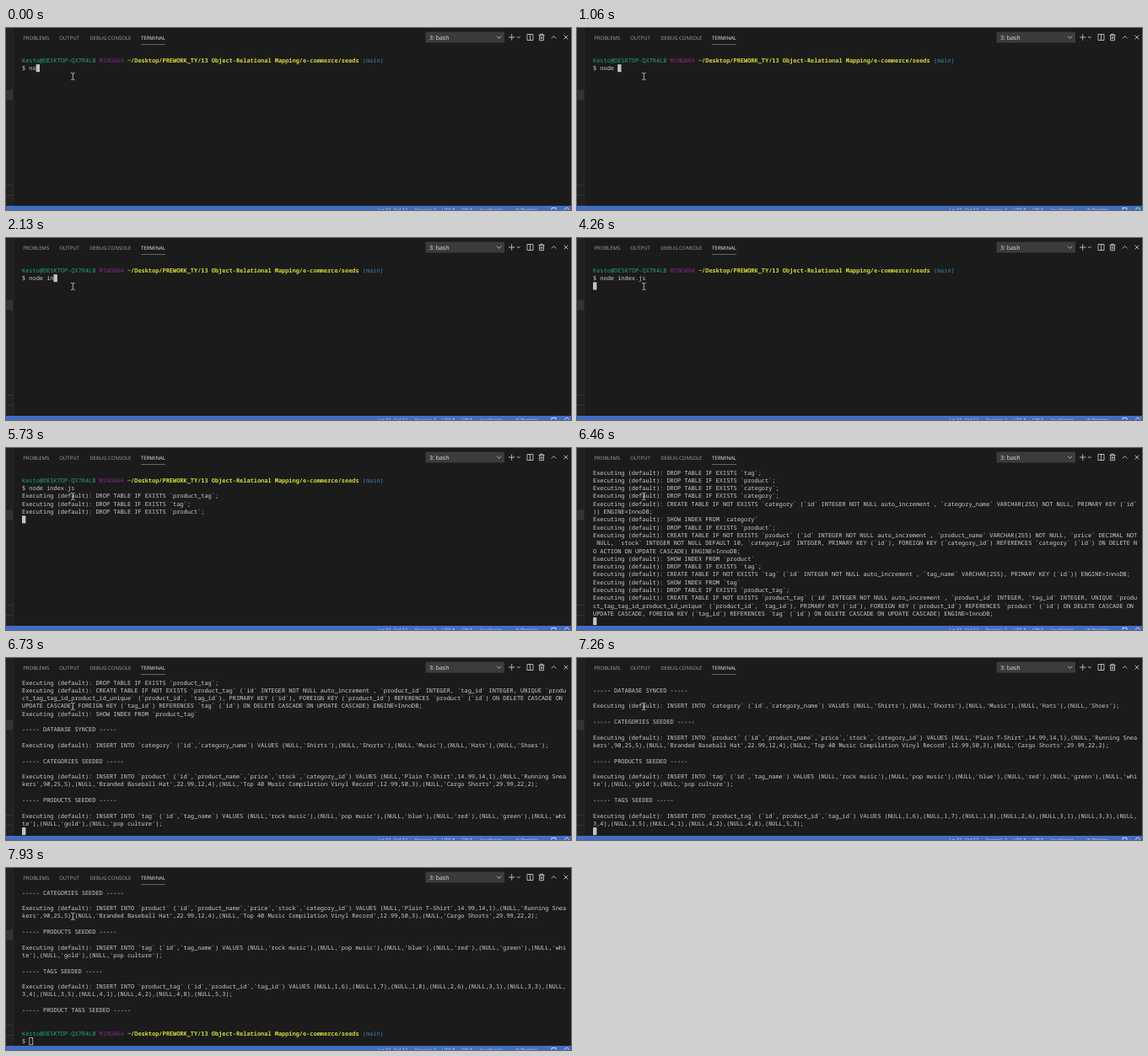
Recreate the animation shown at these times as an HTML page. Size 670 by 216 pixels, loop 8 s.

```html
<!DOCTYPE html>
<html lang="en">
<head>
<meta charset="utf-8">
<title>Terminal seeding a database</title>
<style>
  html, body { margin: 0; width: 100%; height: 100%; overflow: hidden; background: #1b1b1b; }
  svg { display: block; width: 670px; height: 216px; }
  text { white-space: pre; text-rendering: geometricPrecision; }
  .ui { font-family: "Open Sans", "Noto Sans", sans-serif; font-size: 6px; fill: #a3a3a3; }
  .ui .active { fill: #ececec; font-weight: 500; }
  .ui.shell { font-size: 7px; fill: #e6e6e6; }
  .ui.status { font-size: 5.8px; fill: #cfdaf2; }
  #rows { font-family: "Noto Sans Mono", "DejaVu Sans Mono", monospace; font-size: 6.94px; font-weight: 500; fill: #cfcfcf; }
  .icon { fill: none; stroke: #c5c5c5; stroke-width: .9; }
  .user { fill: #22a878; }
  .system { fill: #87298b; }
  .path { fill: #d6db3a; font-weight: 600; }
  .branch { fill: #3f87ae; }
</style>
</head>
<body>
<svg viewBox="0 0 670 216">
  <rect width="670" height="216" fill="#1b1b1b"/>

  <!-- side bar -->
  <rect width="8" height="211" fill="#212122"/>
  <rect x="8" width="1" height="211" fill="#272727"/>
  <rect y="73.5" width="8" height="12" fill="#333438"/>
  <path d="M0 186.5H8M0 198.5H8" stroke="#363636"/>

  <!-- panel tabs -->
  <g class="ui">
    <text x="20.2" y="13.5">PROBLEMS</text>
    <text x="63.2" y="13.5">OUTPUT</text>
    <text x="99.2" y="13.5">DEBUG CONSOLE</text>
    <text class="active" x="160" y="13.5">TERMINAL</text>
  </g>
  <path d="M160 19.5H189" stroke="#858585" stroke-width=".7"/>

  <!-- panel actions -->
  <rect x="497.5" y="4.5" width="93.5" height="13" fill="#3b3b3b"/>
  <text class="ui shell" x="502" y="13.6">3: bash</text>
  <g class="icon">
    <path d="M582 9.7l2.6 2.6 2.6-2.6"/>
    <path d="M596 11h7.4M599.7 7.3v7.4M606 10l1.9 1.9 1.9-1.9"/>
    <path d="M618 7.5h7v7h-7zM621.5 7.5v7"/>
    <path d="M631.6 8.5h7M633.6 8.5v-1.3h3v1.3M632.6 8.5v6.2h5v-6.2M634.3 10v3.2M635.9 10v3.2"/>
    <path d="M646.8 12.4l2.8-2.8 2.8 2.8"/>
    <path d="M661.6 8.6l4.8 4.8M666.4 8.6l-4.8 4.8"/>
  </g>

  <g id="rows"></g>
  <rect id="cursor"/>

  <!-- mouse pointer -->
  <path d="M77 53.5h1.6l.7.6.7-.6h1.6M79.3 54v6.8M77 61.3h1.6l.7-.6.7.6h1.6" fill="none" stroke="#d8d8d8" stroke-width=".8"/>

  <!-- status bar -->
  <rect y="211" width="670" height="5" fill="#416dc4"/>
  <g class="ui status">
    <text x="442" y="218.4">Ln 31, Col 12</text>
    <text x="485" y="218.4">Spaces: 2</text>
    <text x="517" y="218.4">UTF-8</text>
    <text x="540" y="218.4">CRLF</text>
    <text x="562" y="218.4">JavaScript</text>
    <text x="604" y="218.4">⊘ Prettier</text>
  </g>
  <path d="M647 217v-3.5h5v3.5M662.5 217c0-5 5-5 5 0" fill="none" stroke="#dfe7f7" stroke-width=".9"/>
</svg>

<script>
const LOOP = 8000, COLS = 155, ROWS = 20;
const LEFT = 19, TOP = 24.6, CELL = 4.164, PITCH = 9.29;

const promptParts = [
  ["user", "Kesto@DESKTOP-QX7R4LB "],
  ["system", "MINGW64 "],
  ["path", "~/Desktop/PREWORK_TY/13 Object-Relational Mapping/e-commerce/seeds "],
  ["branch", "(main)"],
];
const prompt = promptParts.map(part => part[1]).join("");

const run = sql => "Executing (default): " + sql + "\n";
const drop = table => run("DROP TABLE IF EXISTS `" + table + "`;");
const show = table => run("SHOW INDEX FROM `" + table + "`");
const create = (table, columns) => run("CREATE TABLE IF NOT EXISTS `" + table +
  "` (`id` INTEGER NOT NULL auto_increment , " + columns + ") ENGINE=InnoDB;");
const insert = (table, columns, values) => run("INSERT INTO `" + table + "` (`id`," +
  columns.split(" ").map(name => "`" + name + "`").join() + ") VALUES " +
  values.split("|").map(value => "(NULL," + value + ")").join() + ";");
const quoted = words => words.split("|").map(word => "'" + word + "'").join("|");
const banner = title => "\n----- " + title + " -----\n\n";
const key = "PRIMARY KEY (`id`)";
const foreign = (table, onDelete) => ", FOREIGN KEY (`" + table + "_id`) REFERENCES `" + table +
  "` (`id`) ON DELETE " + onDelete + " ON UPDATE CASCADE";

// Each step appends text to the terminal at its time in ms.
const steps = [
  [0, "\n" + prompt + "\n$ no"],
  [200, "d"], [530, "e"], [930, " "], [1530, "i"], [1930, "n"],
  [2330, "d"], [2600, "e"], [2860, "x"], [3130, "."], [3400, "j"], [3600, "s"],
  [4060, "\n"],
  [5260, drop("product_tag")],
  [5460, drop("tag")],
  [5660, drop("product")],
  [5800, drop("category")],
  [5860, drop("category")],
  [5930, create("category", "`category_name` VARCHAR(255) NOT NULL, " + key)],
  [6060, show("category") + drop("product")],
  [6130, create("product", "`product_name` VARCHAR(255) NOT NULL, `price` DECIMAL NOT NULL, " +
    "`stock` INTEGER NOT NULL DEFAULT 10, `category_id` INTEGER, " + key + foreign("category", "NO ACTION"))],
  [6200, show("product") + drop("tag")],
  [6330, create("tag", "`tag_name` VARCHAR(255), " + key)],
  [6460, show("tag") + drop("product_tag") + create("product_tag",
    "`product_id` INTEGER, `tag_id` INTEGER, UNIQUE `product_tag_tag_id_product_id_unique` " +
    "(`product_id`, `tag_id`), " + key + foreign("product", "CASCADE") + foreign("tag", "CASCADE"))],
  [6600, show("product_tag") + banner("DATABASE SYNCED")],
  [6660, insert("category", "category_name", quoted("Shirts|Shorts|Music|Hats|Shoes")) + banner("CATEGORIES SEEDED")],
  [6730, insert("product", "product_name price stock category_id",
    "'Plain T-Shirt',14.99,14,1|'Running Sneakers',90,25,5|'Branded Baseball Hat',22.99,12,4|" +
    "'Top 40 Music Compilation Vinyl Record',12.99,50,3|'Cargo Shorts',29.99,22,2") +
    banner("PRODUCTS SEEDED") +
    insert("tag", "tag_name", quoted("rock music|pop music|blue|red|green|white|gold|pop culture"))],
  [6930, banner("TAGS SEEDED") + insert("product_tag", "product_id tag_id",
    "1,6|1,7|1,8|2,6|3,1|3,3|3,4|3,5|4,1|4,2|4,8|5,3")],
  [7660, banner("PRODUCT TAGS SEEDED") + "\n" + prompt + "\n$ "],
  [7860, ""], // focus leaves the terminal
];

const rows = document.getElementById("rows");
const cursor = document.getElementById("cursor");
const setAll = (node, attrs) => {
  for (const name in attrs) node.setAttribute(name, attrs[name]);
  return node;
};
const svg = (tag, attrs, content = "") => {
  const node = setAll(document.createElementNS("http://www.w3.org/2000/svg", tag), attrs);
  node.textContent = content;
  return node;
};
const wrap = line => line.match(new RegExp(".{1," + COLS + "}", "g")) || [""];

const lineNodes = Array.from({ length: ROWS }, (_, row) =>
  rows.appendChild(svg("text", { x: LEFT, y: TOP + row * PITCH + 7 })));

function draw(count) {
  const text = steps.slice(0, count).map(step => step[1]).join("");
  const lines = text.split("\n").flatMap(wrap).slice(-ROWS);
  lineNodes.forEach((node, row) => {
    const line = lines[row] || "";
    if (line === prompt) {
      node.replaceChildren(...promptParts.map(([name, part]) => svg("tspan", { class: name }, part)));
    } else {
      node.textContent = line;
    }
  });
  const last = lines.length - 1;
  const hollow = count === steps.length;
  const inset = hollow ? 0.4 : 0;
  setAll(cursor, {
    x: LEFT + lines[last].length * CELL + inset,
    y: TOP + last * PITCH + inset,
    width: CELL + 0.2 - inset,
    height: 9 - 2 * inset,
    fill: hollow ? "none" : "#c4c4c4",
    stroke: hollow ? "#c4c4c4" : "none",
    "stroke-width": 0.8,
  });
}

let shown = 0;
const start = performance.now();
function tick() {
  const time = (performance.now() - start) % LOOP;
  const count = steps.filter(step => step[0] <= time).length;
  if (count !== shown) draw(shown = count);
  requestAnimationFrame(tick);
}
tick();
</script>
</body>
</html>
```
